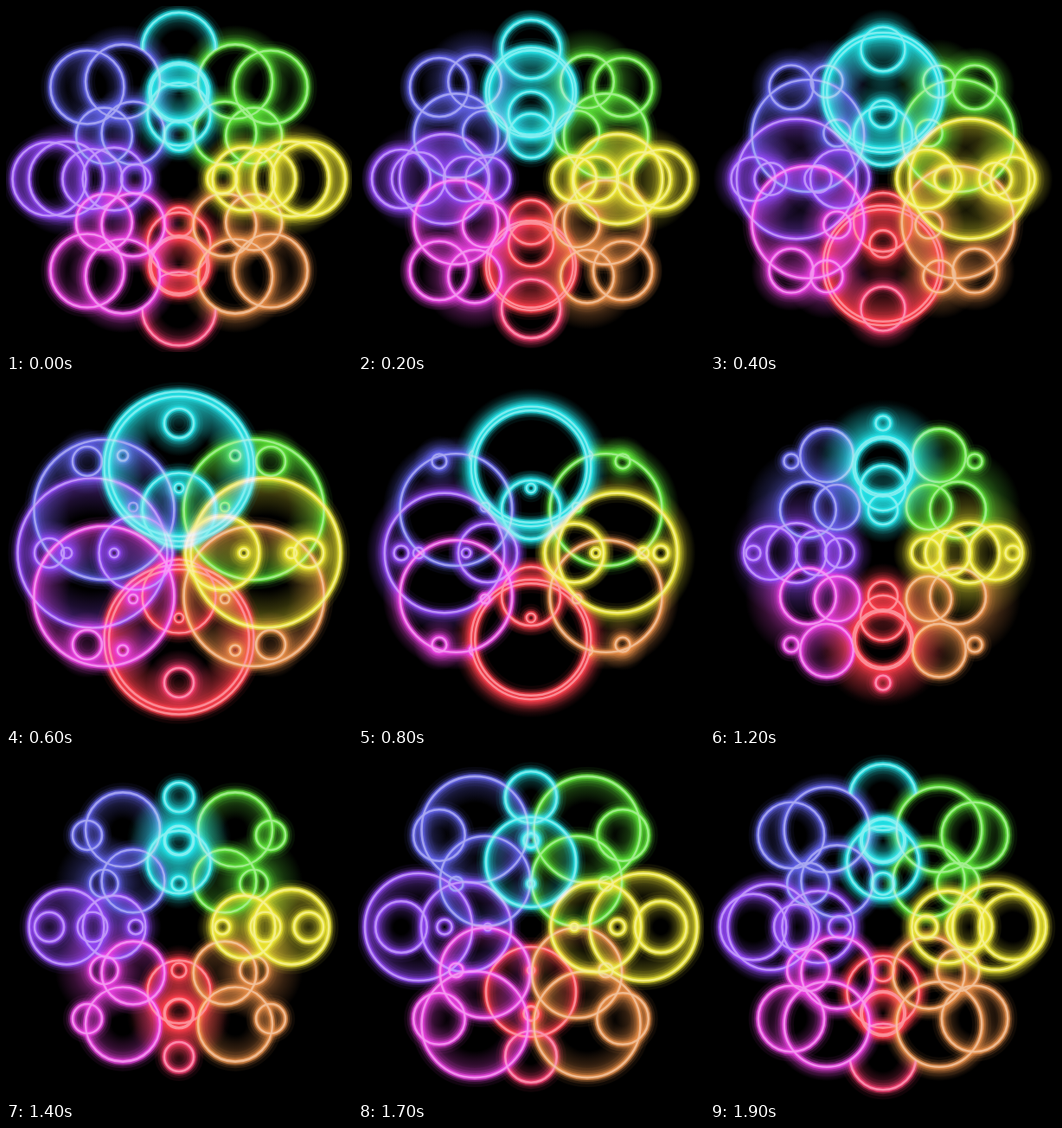
Animation of 400 by 400 pixels, one loop 2000 ms. Source, as an HTML page with a canvas:

```html
<!DOCTYPE html>
<html lang="en">
<head>
<meta charset="utf-8">
<title>Neon rings</title>
<style>
  html, body { margin: 0; width: 100%; height: 100%; overflow: hidden; background: #000; }
  canvas { display: block; width: 400px; height: 400px; }
</style>
</head>
<body>
<canvas id="stage" width="400" height="400"></canvas>
<script>
const ctx = document.getElementById('stage').getContext('2d');
const LOOP = 2000, STEP = 100, TRAIL = 5;

const colors = {
  yellow: [238, 232, 50], green: [92, 225, 55], cyan: [35, 228, 232], blue: [98, 98, 232],
  purple: [146, 72, 245], magenta: [235, 65, 225], red: [250, 62, 76], pink: [250, 62, 115],
  orange: [232, 142, 72]
};

// Angles run counter-clockwise from the right.
function hueAt(angle, distance) {
  if (angle === 0) return colors.yellow;
  if (angle < 90) return colors.green;
  if (angle === 90) return colors.cyan;
  if (angle < 180) return colors.blue;
  if (angle === 180) return colors.purple;
  if (angle < 270) return colors.magenta;
  if (angle === 270) return distance === 150 ? colors.pink : colors.red;
  return colors.orange;
}

// A ring has zero radius at time `zero` and its greatest radius half a loop later.
const ring = (distance, angles, max, zero, masks = false) => ({
  max, zero, masks,
  spots: angles.map(angle => ({
    x: 200 + distance * Math.cos(angle * Math.PI / 180),
    y: 200 - distance * Math.sin(angle * Math.PI / 180),
    color: hueAt(angle, distance)
  }))
});

const vertical = [90, 270], horizontal = [0, 180], diagonal = [45, 135, 225, 315];

// Painted back to front; groups on one line share a layer.
const layers = [
  [ring(150, vertical, 42.5, 1000)],
  [ring(130, [60, 120, 240, 300], 61.5, 700, true)],
  [ring(100, [...horizontal, ...vertical], 86.5, 1600, true),
   ring(100, [30, 90, 150, 210, 270, 330], 81, 1600)],
  [ring(130, horizontal, 62, 700)],
  [ring(150, [...horizontal, ...diagonal], 42.5, 1000)],
  [ring(75, [...horizontal, ...vertical, ...diagonal], 52, 700)],
  [ring(50, [...horizontal, ...vertical], 42.5, 1600)]
];

function radiusAt(group, time) {
  const phase = ((time - group.zero) % LOOP + LOOP) % LOOP / LOOP;
  return group.max * (1 - Math.abs(1 - 2 * phase));
}

const isShrinking = (group, time) => radiusAt(group, time) < radiusAt(group, time - STEP);
const rgba = (color, alpha) => `rgba(${color}, ${alpha})`;

function circle(spot, radius) {
  ctx.beginPath();
  ctx.arc(spot.x, spot.y, radius, 0, 2 * Math.PI);
}

function strokeCircle(spot, radius, width, alpha, white = 0) {
  ctx.strokeStyle = rgba(spot.color.map(c => Math.round(c + (255 - c) * white)), alpha);
  ctx.lineWidth = width;
  circle(spot, radius);
  ctx.stroke();
}

// The afterglow fades outside a shrinking circle and inside a growing one.
function drawTrail(group, time) {
  const now = radiusAt(group, time), shrinking = isShrinking(group, time);
  const reach = TRAIL * group.max / 10;
  const far = shrinking ? Math.min(group.max + 4, now + reach) : Math.max(0, now - reach);
  const outer = Math.max(now, far), alpha = shrinking ? 0.55 : 0.5;
  for (const spot of group.spots) {
    const { x, y, color } = spot;
    const fade = ctx.createRadialGradient(x, y, 0, x, y, outer);
    const stop = (part, a) => fade.addColorStop((now + (far - now) * part) / outer, rgba(color, a));
    stop(0, alpha);
    stop(0.5, alpha * 0.4);
    stop(1, 0);
    ctx.fillStyle = fade;
    circle(spot, outer);
    if (shrinking) ctx.arc(x, y, now, 0, 2 * Math.PI, true);
    ctx.fill();
  }
}

function drawMask(group, time) {
  if (!group.masks || !isShrinking(group, time)) return;
  ctx.fillStyle = '#000';
  for (const spot of group.spots) {
    circle(spot, radiusAt(group, time));
    ctx.fill();
  }
}

function drawOutline(group, time) {
  const radius = radiusAt(group, time);
  if (radius < 1) return;
  for (const spot of group.spots) {
    strokeCircle(spot, radius, 22, 0.07);
    strokeCircle(spot, radius, 15, 0.14);
    strokeCircle(spot, radius, 10, 0.28);
    strokeCircle(spot, radius, 6, 0.7);
    strokeCircle(spot, radius, 2.6, 0.9, 0.45);
  }
}

function draw(time) {
  ctx.globalCompositeOperation = 'source-over';
  ctx.fillStyle = '#000';
  ctx.fillRect(0, 0, 400, 400);
  for (const groups of layers) {
    ctx.globalCompositeOperation = 'lighten';
    groups.forEach(group => drawTrail(group, time));
    ctx.globalCompositeOperation = 'source-over';
    groups.forEach(group => drawMask(group, time));
    ctx.globalCompositeOperation = 'lighten';
    groups.forEach(group => drawOutline(group, time));
  }
}

const start = performance.now();
function tick() {
  const elapsed = (performance.now() - start) % LOOP;
  draw(Math.floor(elapsed / STEP) * STEP);
  requestAnimationFrame(tick);
}
tick();
</script>
</body>
</html>
```
